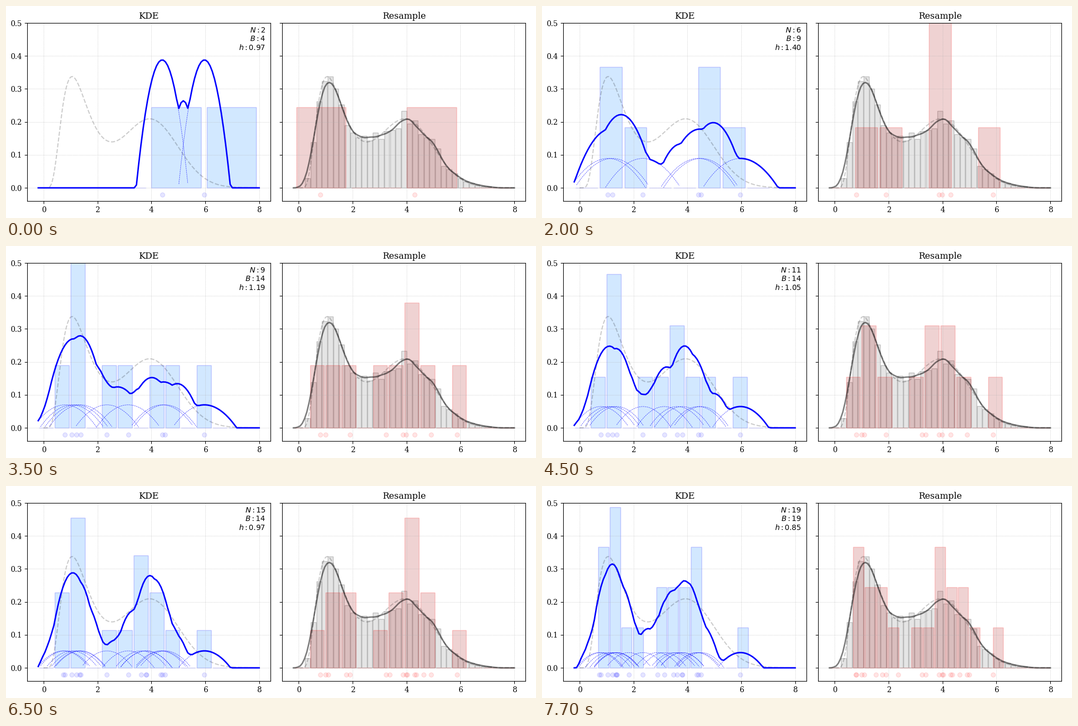
A matplotlib script that plays this animation: 1000x400 px, repeating every 8000 ms.

```python
import numpy as np
import matplotlib.pyplot as plt
from matplotlib.animation import FuncAnimation

plt.rcParams["font.family"] = "DejaVu Serif"

FRAME_MS = 100
LOOP_MS = 8000
LO, HI = -0.2, 8.0
# Start time of every state; the sample grows by one point at each.
STARTS = np.r_[np.arange(0, 7000, 500), 6800:7701:300]

OBSERVED = np.array([4.40, 5.97, 1.215, 4.51, 1.05, 2.35, 0.79, 1.37, 3.14, 3.62,
                     3.81, 0.73, 4.34, 1.34, 3.80, 1.82, 2.89, 3.48, 1.38])
RESAMPLED = np.array([0.80, 4.29, 1.90, 3.86, 3.99, 5.87, 3.23, 4.90, 1.00, 1.10,
                      3.38, 1.77, 4.03, 4.36, 4.64, 0.78, 1.52, 2.35, 4.99])
LARGE_COUNTS = np.array([0, 0, 6, 29, 55, 68, 71, 63, 53, 40, 35, 32, 33, 30, 35, 31,
                         36, 37, 38, 49, 41, 43, 34, 32, 31, 25, 14, 12, 9, 6,
                         4, 3, 2, 1, 1, 0, 0, 0, 0])

grid = np.linspace(LO, HI, 100)


def mixture(x):
    """Equal mix of a log-normal and a normal density."""
    lognormal = np.exp(-((np.log(x) - 0.3) / 0.5) ** 2 / 2) / (0.5 * x)
    normal = np.exp(-((x - 4) ** 2) / 2)
    return 0.5 * (lognormal + normal) / np.sqrt(2 * np.pi)


def kernels(x, points, h):
    """Epanechnikov kernels, one column per point."""
    u = (x[:, None] - points) / h
    return 0.75 * np.clip(1 - u**2, 0, None) / h


fig, axes = plt.subplots(1, 2, figsize=(10, 4), dpi=100, sharey=True)
fig.subplots_adjust(left=0.04, right=0.98, bottom=0.08, top=0.92, wspace=0.05)
left, right = axes

true_x = np.linspace(1e-3, HI, 200)
for ax, title in zip(axes, ("KDE", "Resample")):
    ax.set_title(title)
    ax.set(xlim=(LO - 0.41, HI + 0.41), ylim=(-0.04, 0.5))
    ax.set_xticks(range(0, 9, 2))
    ax.set_yticks(np.arange(6) / 10)
    ax.grid(ls=":", lw=0.5)
    ax.plot(true_x, mixture(true_x), "k--", lw=1.5, alpha=0.2)
    ax.set_autoscale_on(False)

# Large reference sample: histogram and its smoothed density.
n_large = LARGE_COUNTS.sum()
width = (HI - LO) / len(LARGE_COUNTS)
centers = LO + width * (np.arange(len(LARGE_COUNTS)) + 0.5)
right.bar(centers, LARGE_COUNTS / (n_large * width), 0.9 * width,
          color="gray", ec="k", alpha=0.2)
spread = (centers[:, None] + width * (np.arange(10) - 4.5) / 10).ravel()
weights = np.repeat(LARGE_COUNTS / (10 * n_large), 10)
right.plot(grid, kernels(grid, spread, 0.395) @ weights, "k", lw=2, alpha=0.5)

label = left.text(0.98, 0.98, "", transform=left.transAxes, ha="right", va="top")
artists = []


def draw_sample(ax, points, bins, fill, edge):
    bars = ax.hist(points, bins, (LO, HI), density=True, rwidth=0.9,
                   color=fill, ec=edge, alpha=0.2)[2]
    dots = ax.plot(points, np.full(len(points), -0.02), "o", color=edge, alpha=0.1)
    artists.extend([*bars, *dots])


def update(frame):
    while artists:
        artists.pop().remove()
    n = 1 + int(np.searchsorted(STARTS, frame * FRAME_MS, side="right"))
    bins = 5 * int(np.sqrt(n)) - 1
    points = OBSERVED[:n]
    h = points.std(ddof=1) * n**-0.2

    draw_sample(left, points, bins, "dodgerblue", "b")
    draw_sample(right, RESAMPLED[:n], bins, "firebrick", "r")

    parts = kernels(grid, points, h) / n
    artists.extend(left.plot(grid, np.where(parts > 0, parts, np.nan), "b--", lw=0.5, alpha=0.8))
    artists.extend(left.plot(grid, parts.sum(axis=1), "b", lw=2))
    label.set_text(f"$N:{n}$\n$B:{bins}$\n$h:{h:.2f}$")
    return artists


animation = FuncAnimation(fig, update, frames=LOOP_MS // FRAME_MS, interval=FRAME_MS,
                          repeat=True, repeat_delay=0)
plt.show()
```
